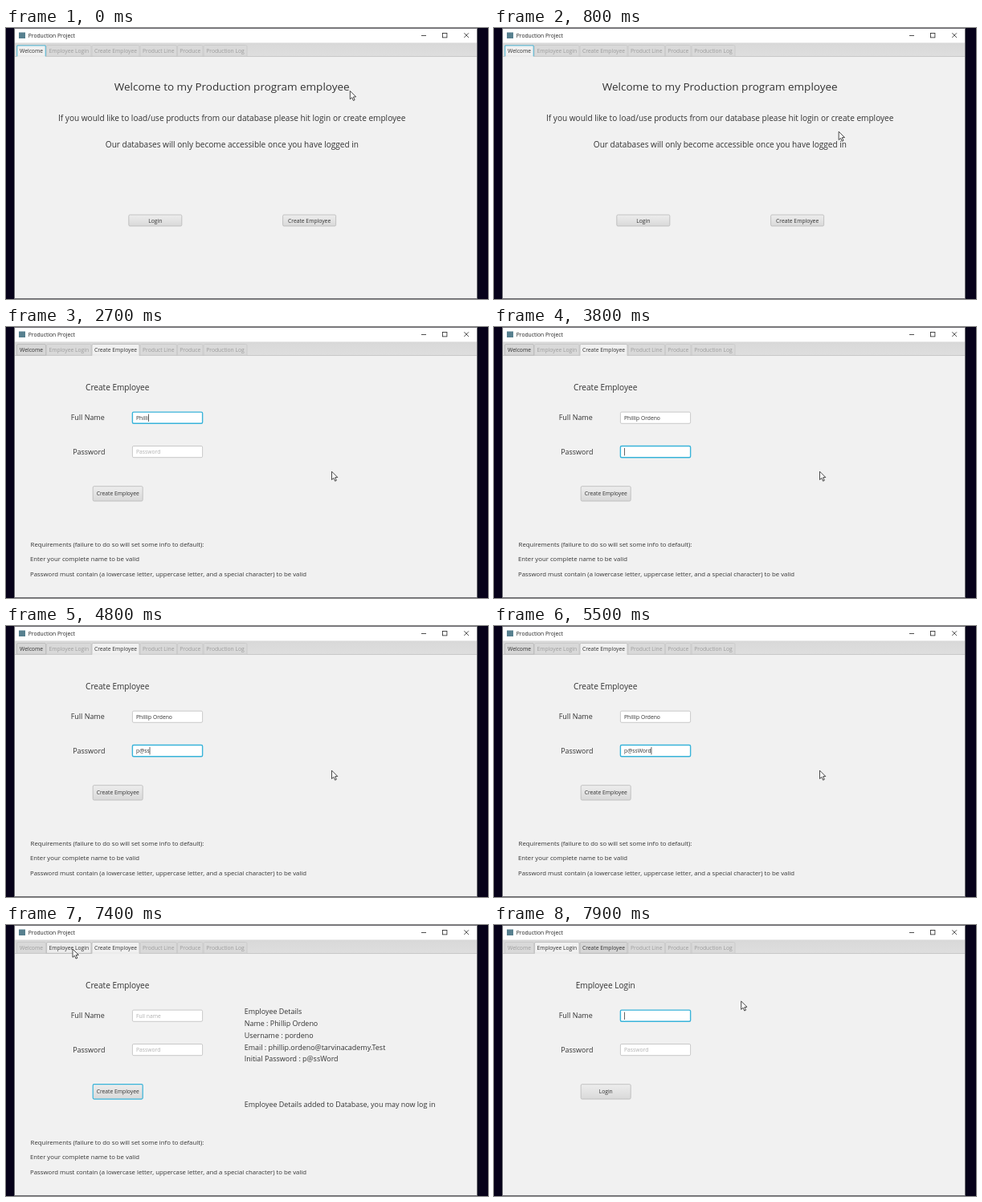
These frames come from a looping animation (600x338 px, 8000 ms). An HTML page with a canvas:

```html
<!DOCTYPE html>
<html lang="en">
<head>
<meta charset="utf-8">
<title>Production Project</title>
<style>
html, body { margin: 0; height: 100%; overflow: hidden; background: #07021a; }
canvas { display: block; width: 100vw; height: 100vh; }
</style>
</head>
<body>
<canvas id="stage"></canvas>
<script>
const W = 600, H = 338, LOOP = 8000, STEP = 100;
const INK = '#333', FAINT = '#9d9d9d', PAGE = '#f1f1f1', BLUE = '#38b3d9';
const SMALL = 6.75, NOTE = 7.78, LABEL = 8.95, BODY = 10.07, HEAD = 13.5;

const FULL_NAME = 'Phillip Ordeno';
const PASSWORD = 'p@ssWord';
const DETAILS = [
  'Employee Details',
  'Name : ' + FULL_NAME,
  'Username : pordeno',
  'Email : phillip.ordeno@tarvinacademy.Test',
  'Initial Password : ' + PASSWORD
];
const RULES = [
  'Requirements (failure to do so will set some info to default):',
  'Enter your complete name to be valid',
  'Password must contain (a lowercase letter, uppercase letter, and a special character) to be valid'
];

// label, left edge, right edge
const TABS = [
  ['Welcome', 13.5, 49.5], ['Employee Login', 50.5, 106], ['Create Employee', 107, 166],
  ['Product Line', 167, 212.5], ['Produce', 213.5, 245], ['Production Log', 246, 300]
];

// time, x, y of the pointer tip
const POINTER = [
  [0, 428.3, 78.5], [450, 458, 96], [900, 425, 134], [1200, 405.5, 180.2],
  [6300, 405.5, 180.2], [7300, 83, 30], [7500, 83, 30], [7900, 307.7, 95]
];

// moment at which each character appears
const nameKeys = [...FULL_NAME].map((c, i) => 2200 + 100 * i + (i > 7 ? 100 : 0));
const passKeys = [4000, 4200, 4500, 4800, 5200, 5300, 5400, 5500];

const canvas = document.getElementById('stage');
const ctx = canvas.getContext('2d');
const dpr = window.devicePixelRatio || 1;
canvas.width = W * dpr;
canvas.height = H * dpr;

const typed = (text, keys, t) => text.slice(0, keys.filter(k => k <= t).length);

function pointerAt(t) {
  let i = 0;
  while (i < POINTER.length - 2 && POINTER[i + 1][0] <= t) i++;
  const [t0, x0, y0] = POINTER[i], [t1, x1, y1] = POINTER[i + 1];
  const p = Math.min(1, (t - t0) / (t1 - t0));
  const e = p * p * (3 - 2 * p);
  return [x0 + (x1 - x0) * e, y0 + (y1 - y0) * e];
}

function setFont(size) {
  ctx.font = `${size}px "Open Sans", "Noto Sans", sans-serif`;
}

function text(str, x, y, size, color = INK, align = 'left') {
  setFont(size);
  ctx.textAlign = align;
  ctx.fillStyle = color;
  ctx.fillText(str, x, y);
}

function fill(x, y, w, h, color) {
  ctx.fillStyle = color;
  ctx.fillRect(x, y, w, h);
}

function outline(x, y, w, h, color, line) {
  ctx.strokeStyle = color;
  ctx.lineWidth = line;
  ctx.strokeRect(x, y, w, h);
}

function shade(y0, y1, from, to) {
  const g = ctx.createLinearGradient(0, y0, 0, y1);
  g.addColorStop(0, from);
  g.addColorStop(1, to);
  return g;
}

function box(x, y, w, h, paint, edge, line = 0.8, radius = 1.5) {
  ctx.beginPath();
  ctx.roundRect(x, y, w, h, radius);
  ctx.fillStyle = paint;
  ctx.fill();
  ctx.strokeStyle = edge;
  ctx.lineWidth = line;
  ctx.stroke();
}

function polyline(points, color, line) {
  ctx.beginPath();
  points.forEach(([x, y]) => ctx.lineTo(x, y));
  ctx.strokeStyle = color;
  ctx.lineWidth = line;
  ctx.stroke();
}

function button(label, x, y, w, h, focused, pressed) {
  const paint = pressed ? shade(y, y + h, '#dcdcdc', '#cfcfcf') : shade(y, y + h, '#ededed', '#d9d9d9');
  box(x, y, w, h, paint, focused ? BLUE : '#b6b6b6', focused ? 1.2 : 0.8);
  text(label, x + w / 2, y + h / 2 + 2.5, SMALL, INK, 'center');
}

function field(y, value, prompt, focused) {
  box(157.4, y, 87.2, 14.2, '#fff', focused ? BLUE : '#bdbdbd', focused ? 1.4 : 0.8);
  const base = y + 9.6;
  if (value) text(value, 162, base, SMALL);
  else if (!focused) text(prompt, 162, base, SMALL, '#b0b0b0');
  if (focused) {
    setFont(SMALL);
    fill(162 + ctx.measureText(value).width, y + 2.5, 0.7, 9.4, '#222');
  }
}

function frame() {
  fill(0, 0, W, H, '#07021a');
  fill(10, 0, 577, H, PAGE);
  fill(11, 1, 575, 17.5, '#fff');
  fill(16, 5.5, 8, 7.5, '#57808f');
  text('Production Project', 27.7, 11.8, SMALL, '#222');
  fill(517, 9.2, 6, 0.8, '#222');
  outline(543.5, 6.5, 5.4, 5.4, '#222', 0.8);
  polyline([[570.3, 6.3], [576, 12]], '#222', 0.8);
  polyline([[576, 6.3], [570.3, 12]], '#222', 0.8);
}

function tabBar(active, enabled, focused, hovered) {
  fill(11, 18.5, 575, 17, shade(18, 35, '#d8d8d8', '#dedede'));
  fill(11, 35, 575, 0.8, '#c1c1c1');
  TABS.forEach(([label, x0, x1], i) => {
    const on = enabled.includes(i), chosen = i === active;
    const paint = chosen ? PAGE : !on ? '#d9d9d9' : i === hovered ? '#ededed' : '#d6d6d6';
    box(x0, 21.5, x1 - x0, 13.7, paint, on ? '#b4b4b4' : '#c6c6c6', 0.7, [1.5, 1.5, 0, 0]);
    if (chosen) fill(x0 + 0.3, 34.5, x1 - x0 - 0.6, 1.4, PAGE);
    if (chosen && focused) {
      polyline([[x0 + 0.3, 35.3], [x0 + 0.3, 21.9], [x1 - 0.3, 21.9], [x1 - 0.3, 35.3]], '#52bcdb', 1);
    }
    text(label, (x0 + x1) / 2, 31.4, SMALL, on ? INK : FAINT, 'center');
  });
}

function welcomePage(t) {
  text('Welcome to my Production program employee', 281.2, 77.5, HEAD, INK, 'center');
  text('If you would like to load/use products from our database please hit login or create employee',
    281.2, 115.6, BODY, INK, 'center');
  text('Our databases will only become accessible once you have logged in', 281.4, 149.4, BODY, INK, 'center');
  button('Login', 152.8, 233, 66, 14, t >= 1100 && t < 1300);
  button('Create Employee', 344.6, 233, 66, 14, t >= 1300, t >= 1600);
}

function form(title, action, name, pass, focus, pressed) {
  text(title, 138.7, 78.7, BODY, INK, 'center');
  text('Full Name', 80.7, 116.3, LABEL);
  text('Password', 83.2, 158.7, LABEL);
  field(106.1, name, 'Full name', focus === 'name');
  field(148.5, pass, 'Password', focus === 'pass');
  button(action, 108.2, 198.7, 62, 18.4, focus === 'button', pressed);
}

function createPage(t) {
  const done = t >= 6100;
  const focus = t >= 5700 ? 'button' : t >= 3800 ? 'pass' : t >= 1900 ? 'name' : '';
  form('Create Employee', 'Create Employee',
    done ? '' : typed(FULL_NAME, nameKeys, t),
    done ? '' : typed(PASSWORD, passKeys, t),
    focus, t >= 5900 && !done);
  RULES.forEach((line, i) => text(line, i ? 30 : 30.6, 273.8 + 18.4 * i, NOTE));
  if (!done) return;
  DETAILS.forEach((line, i) => text(line, 296.7, 111.4 + 14.75 * i, LABEL));
  text('Employee Details added to Database, you may now log in', 296.7, 227, LABEL);
}

function pointer(x, y) {
  ctx.save();
  ctx.translate(x, y);
  ctx.beginPath();
  [[0, 0], [0, 10.3], [2.4, 8.2], [4.1, 12], [5.8, 11.2], [4.1, 7.5], [7.3, 7.3]]
    .forEach(([px, py]) => ctx.lineTo(px, py));
  ctx.closePath();
  ctx.fillStyle = '#fff';
  ctx.fill();
  ctx.strokeStyle = '#1c1c1c';
  ctx.lineWidth = 0.8;
  ctx.stroke();
  ctx.restore();
}

function draw(t) {
  ctx.setTransform(dpr, 0, 0, dpr, 0, 0);
  const [x, y] = pointerAt(t);
  const hovered = y > 21 && y < 35 ? TABS.findIndex(([, x0, x1]) => x > x0 && x < x1) : -1;
  frame();
  if (t < 1700) {
    tabBar(0, [0], t < 1100, hovered);
    welcomePage(t);
  } else if (t < 7600) {
    tabBar(2, t < 6100 ? [0, 2] : [1, 2], false, hovered);
    createPage(t);
  } else {
    tabBar(1, [1, 2], t < 7800, hovered);
    form('Employee Login', 'Login', '', '', t >= 7800 ? 'name' : '');
  }
  outline(10.5, 0.5, 576, 337, '#6b6a70', 1);
  pointer(x, y);
}

let start;
function tick(now) {
  start ??= now;
  draw(Math.floor((now - start) % LOOP / STEP) * STEP);
  requestAnimationFrame(tick);
}
requestAnimationFrame(tick);
</script>
</body>
</html>
```
